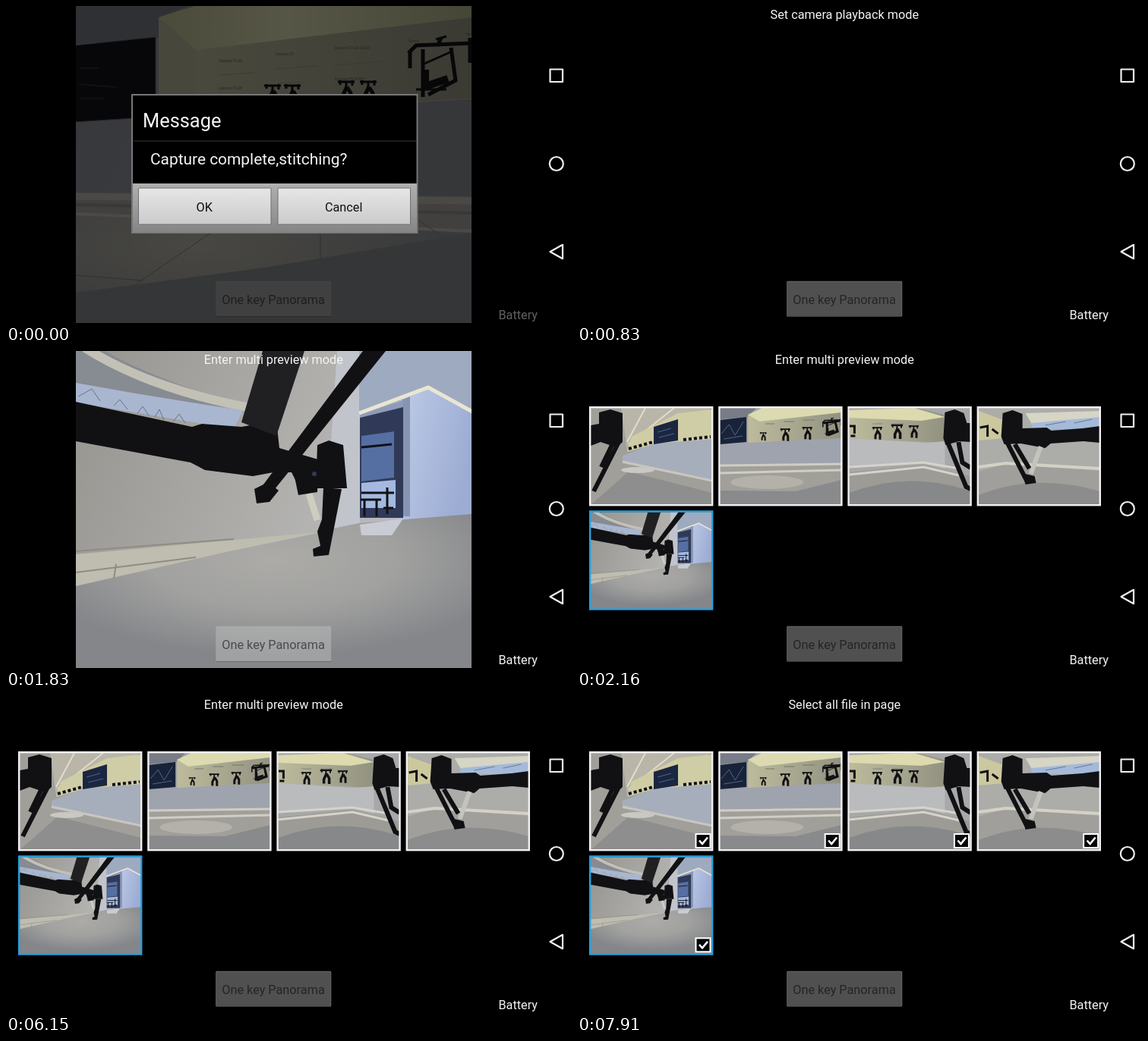
An HTML page for the animation above (8 s loop, 744 by 418 pixels).

```html
<!DOCTYPE html>
<html lang="en">
<head>
<meta charset="utf-8">
<title>One key Panorama</title>
<style>
  html, body { margin: 0; width: 100%; height: 100%; overflow: hidden; background: #000; }
  svg { display: block; }
  text { font-family: Roboto, sans-serif; font-size: 16.25px; }
  .label text { font: 4.6px "Noto Serif", serif; fill: #57574b; }
  .dark { fill: #111114; }
  .line { fill: none; stroke: #111114; }
  .mid { text-anchor: middle; }
</style>
</head>
<body>
<svg id="stage" width="100%" height="100%" viewBox="0 0 744 418">
  <defs>
    <linearGradient id="wall" x2="1" y2=".2">
      <stop stop-color="#868a93"/><stop offset=".5" stop-color="#96979f"/><stop offset="1" stop-color="#878990"/>
    </linearGradient>
    <linearGradient id="alcove" x2="1">
      <stop stop-color="#bdbb9b"/><stop offset=".4" stop-color="#acab92"/><stop offset="1" stop-color="#929281"/>
    </linearGradient>
    <linearGradient id="glow" x2="1">
      <stop stop-color="#bdbc93"/><stop offset=".4" stop-color="#d9d8b0"/><stop offset="1" stop-color="#b0b08a"/>
    </linearGradient>
    <radialGradient id="floor" cx=".3" cy=".4" r=".65">
      <stop stop-color="#b5b2a6"/><stop offset="1" stop-color="#8d8f92"/>
    </radialGradient>
    <radialGradient id="ground" cx=".5" cy=".3" r=".62">
      <stop stop-color="#acaba8"/><stop offset=".5" stop-color="#a1a19f"/><stop offset="1" stop-color="#84868a"/>
    </radialGradient>
    <linearGradient id="room" x2="1" y2=".3">
      <stop stop-color="#96948f"/><stop offset=".6" stop-color="#b0afac"/><stop offset="1" stop-color="#bdc0c8"/>
    </linearGradient>
    <linearGradient id="side" x2="1" y2=".4">
      <stop stop-color="#bdcae6"/><stop offset="1" stop-color="#9cacd3"/>
    </linearGradient>
    <linearGradient id="panel" x2="0" y2="1"><stop stop-color="#b0b0b0"/><stop offset="1" stop-color="#858585"/></linearGradient>
    <linearGradient id="key" x2="0" y2="1"><stop stop-color="#e6e6e6"/><stop offset="1" stop-color="#cbcbcb"/></linearGradient>

    <g id="gimbal">
      <path class="line" stroke-width="3" d="M-11-13H11M-8-15V-9M8-15V-8M0-13V-5"/>
      <path class="line" stroke-width="5" d="M1-7L-4 4V12M1-6L6 2V13"/>
    </g>
    <g id="rig">
      <path class="line" stroke-width="5" d="M530 62L540 52L613 49M532 60V82M573 42L568 53M549 57V120M586 55L592 98L556 117M611 42V75"/>
      <path class="line" stroke-width="10" d="M552 84V106L582 96"/>
      <path class="line" stroke-width="3" d="M566 44L580 40M551 76L587 60M540 110H580"/>
    </g>

    <!-- showroom -->
    <svg id="showroom" width="521" height="418" viewBox="92 0 521 418">
      <path fill="url(#wall)" d="M92 0H614V260H92Z"/>
      <path fill="#737881" d="M92 0H240L201 15V42L92 50Z"/>
      <path fill="url(#alcove)" d="M201 15L250 0H614V123L201 146Z"/>
      <path fill="#b3b295" d="M201 15L250 58V140L201 146Z"/>
      <path fill="url(#glow)" d="M204 14L250 0H614V15L250 58Z"/>
      <path fill="#111216" stroke="#555861" d="M90 52L197 41V146L90 153Z"/>
      <path stroke="#3b3e48" d="M97 82H122M96 103L146 107M98 122H128"/>
      <g class="label">
        <text x="280" y="74">Lumora T3-2D</text><text x="355" y="65">Lumora T5</text>
        <text x="433" y="57">Lumora T5-2D (4-HD)</text><text x="280" y="110">Lumora T4-2D</text>
        <text x="433" y="98">Lumora T6 (5-HD)</text><text x="530" y="48">Varon</text><text x="605" y="39">Vero</text>
      </g>
      <path stroke="#8a8a7a" stroke-width=".7" d="M280 91L327 88M354 83L409 79M433 78L496 73M280 126L327 123M357 102L391 100"/>
      <use href="#gimbal" x="351" y="118"/><use href="#gimbal" x="377" y="118"/>
      <use href="#gimbal" x="448" y="113"/><use href="#gimbal" x="477" y="113"/>
      <path class="line" stroke-width="4" d="M265 136H273M284 135H293"/>
      <use href="#rig"/>
      <path fill="none" stroke="#a8a8a0" d="M201 146L614 122"/>
      <path fill="url(#floor)" d="M92 246L614 251V418H92Z"/>
      <path fill="#a6a19b" d="M92 246L614 251V297L92 275Z"/>
      <path fill="none" stroke="#bdb8b0" stroke-width="9" d="M92 251L614 257"/>
      <path fill="none" stroke="#8f8d8a" stroke-width="4" d="M92 262L614 273"/>
      <path fill="none" stroke="#bdb9b1" stroke-width="4" d="M92 274L614 297"/>
      <path fill="#85878a" d="M92 378L340 345L614 299V418H92Z"/>
      <path fill="none" stroke="#777875" d="M315 268L172 366M414 270V336M527 272L578 306M92 355L180 362"/>
    </svg>

    <!-- aircraft arm -->
    <svg id="arm" width="521" height="418" viewBox="92 0 521 418">
      <path fill="url(#room)" d="M92 0H614V418H92Z"/>
      <path fill="#878b92" d="M92 0H130Q210 45 322 72L312 80L92 45Z"/>
      <path fill="none" stroke="#c3c0b6" stroke-width="12" d="M104-4Q190 50 322 75"/>
      <path fill="#a9b6d0" d="M92 42Q200 62 312 78L300 103L92 68Z"/>
      <path fill="none" stroke="#66738c" d="M95 60L113 50L124 66M142 72L150 64L160 77M173 82L180 73L188 85M196 87L202 77L208 91M220 93L228 83L236 95"/>
      <path fill="#c1c4cb" d="M436 0H466V245H420Z"/>
      <path fill="#9eaabf" d="M465 0H614V78L556 46L465 82Z"/>
      <path fill="url(#side)" d="M522 62L556 50L614 82V222H522Z"/>
      <path fill="#8794b2" d="M522 64L532 60V218H522Z"/>
      <path fill="#8e9cb9" d="M466 84L523 65V90H466Z"/>
      <path fill="none" stroke="#e9e6d2" stroke-width="5" d="M465 82L556 48L614 80"/>
      <path fill="#303a58" d="M466 88L523 74V220H466Z"/>
      <path fill="#566fa3" d="M468 112L511 106V167L468 172Z"/>
      <path fill="#a3b9e0" d="M468 174L513 170V207H468Z"/>
      <path class="line" stroke-width="3" d="M468 127L508 123M468 187H511M467 196H494M472 196V218M488 196V218M502 180V215M497 207H510"/>
      <path fill="url(#ground)" d="M92 308L290 262L465 227L614 215V418H92Z"/>
      <path fill="#bfbcb0" d="M92 268L290 250L420 238L290 265L92 310Z"/>
      <path fill="none" stroke="#8f8c82" stroke-width="2" d="M92 264L300 248M92 292L250 272M145 281L142 300"/>
      <path fill="#c9ccd4" d="M466 229L523 221L508 243H468Z"/>
      <path class="dark" d="M92 67L245 100L258 96L310 100L356 92L360 128L411 143L410 184L385 178L376 160L352 160L325 165L262 157L243 147L92 119Z"/>
      <path fill="#202023" d="M338 0H393L356 112L310 94Z"/>
      <path class="dark" d="M470 0H500L354 182L339 176Z"/>
      <path class="dark" d="M327 182L345 173L359 184L347 199L330 201Z"/>
      <path class="dark" d="M410 124L425 118L444 124L449 181H408Z"/>
      <path fill="none" stroke="#cfcdc0" stroke-width="9" d="M399 188L410 223"/>
      <path class="dark" d="M380 166H410V186L385 190ZM418 180L442 182L425 269L405 271L404 261L414 257L410 238L416 222Z"/>
      <circle cx="406" cy="162" r="3" fill="#2c3b5c"/>
    </svg>

    <!-- small pictures, 160 x 128 -->
    <svg id="pic0" width="160" height="128">
      <path fill="#a09f9a" d="M0 0H160V128H0Z"/>
      <path fill="#b9b6a9" d="M40 0H160L48 55Z"/>
      <path fill="none" stroke="#e2ddc8" stroke-width="2" d="M72 0L48 45M110 0L50 48"/>
      <path fill="#cfcda6" d="M48 58L54 38L115 7L160 2V42L84 48Z"/>
      <path fill="#a7aebb" d="M42 63L84 47L160 41V97L42 73Z"/>
      <path fill="#1b2640" d="M83 25L115 15V43L83 48Z"/>
      <path stroke="#4a6694" d="M88 32L106 27M90 39L110 34"/>
      <path class="line" stroke-width="4" stroke-dasharray="4 3" d="M50 54L82 45M122 42L158 38"/>
      <path fill="none" stroke="#c9c6be" stroke-width="3" d="M42 71L160 96"/>
      <path fill="#8e8e8e" d="M0 128L50 84L160 112V128Z"/>
      <ellipse cx="62" cy="82" rx="22" ry="4" fill="#c9c8c3"/>
      <path class="dark" d="M11 6L26 2L42 7V45L34 52L13 45L0 50V23L11 21Z"/>
      <path class="line" stroke-width="6" d="M37 45L4 110M29 47L14 78"/>
    </svg>
    <svg id="pic1" width="160" height="128">
      <path fill="#9ea3ae" d="M0 0H160V128H0Z"/>
      <path fill="#777c86" d="M0 0H48L36 12L0 15Z"/>
      <path fill="url(#alcove)" d="M37 9L56 0H160V40L37 46Z"/>
      <path fill="#dcdab0" d="M37 9L56 0H160V6L52 18Z"/>
      <path fill="#182339" d="M0 16L35 12V45L0 48Z"/>
      <path fill="none" stroke="#50668a" d="M2 34L12 22L20 36L31 18M5 41L30 37"/>
      <path d="M60 21H72M84 18H98M109 16H125" stroke="#77776a"/>
      <use href="#gimbal" transform="translate(57 38)scale(.4)"/><use href="#gimbal" transform="translate(86 36)scale(.6)"/>
      <use href="#gimbal" transform="translate(115 34)scale(.6)"/><use href="#rig" transform="translate(-24 1)scale(.3)"/>
      <path class="line" stroke-width="3" d="M136 20L158 17M141 20V36M152 19L155 31L142 36"/>
      <path fill="#a19f99" d="M0 75L160 73V128H0Z"/>
      <path fill="none" stroke="#d0cdc5" stroke-width="3" d="M0 76L160 74M0 86L160 82"/>
      <path fill="#898a8c" d="M0 109L100 110L160 95V128H0Z"/>
      <ellipse cx="62" cy="98" rx="48" ry="9" fill="#b3b1aa"/>
    </svg>
    <svg id="pic2" width="160" height="128">
      <path fill="#a6a8aa" d="M0 0H160V128H0Z"/>
      <path fill="url(#alcove)" d="M0 5L90 0L125 9V46L0 40Z"/>
      <path fill="#dcdaae" d="M0 3L85 0L126 12L95 17L0 13Z"/>
      <path fill="#b9bbbd" d="M0 40L102 46L126 44V80L98 73L0 78Z"/>
      <path stroke="#84847a" d="M31 21H44M57 21H72M80 23H92"/>
      <path class="line" stroke-width="3" d="M0 24H7V34M2 37H8"/>
      <use href="#gimbal" transform="translate(37 34)scale(.6)"/><use href="#gimbal" transform="translate(63 32)scale(.7)"/>
      <use href="#gimbal" transform="translate(85 32)scale(.6)"/>
      <path fill="#9d9b96" d="M0 85L98 75L160 90V128H0Z"/>
      <path fill="none" stroke="#d6d3ca" stroke-width="3" d="M0 78L98 72L145 80M0 88L98 78L145 89"/>
      <path fill="#878889" d="M0 112Q80 82 160 110V128H0Z"/>
      <path class="dark" d="M126 6L139 2L151 7L155 20H160V45L145 44L127 49L124 40Z"/>
      <path class="line" stroke-width="6" d="M130 46L154 104L160 107M144 45L149 72L160 79"/>
    </svg>
    <svg id="pic3" width="160" height="128">
      <path fill="#acaca9" d="M0 0H160V128H0Z"/>
      <path fill="#cbc89f" d="M0 4L33 16V40L0 43Z"/>
      <path fill="#d6d5c6" d="M62 7L160 4V20L72 24Z"/>
      <path fill="#a5bad9" d="M70 20L160 12V28H70Z"/>
      <path stroke="#667997" d="M88 23L115 18M126 20L150 15"/>
      <path class="line" stroke-width="3" d="M2 26L12 24V38M18 28L26 34"/>
      <path fill="#a09f9b" d="M0 84L34 74L160 83V128H0Z"/>
      <path fill="none" stroke="#d4d1c5" stroke-width="4" d="M0 78L36 73L160 80"/>
      <path fill="#8c8c8c" d="M0 115Q75 85 160 110V128H0Z"/>
      <path class="dark" d="M32 7L45 3L58 8V27L90 26L96 30L137 27L160 24V46L138 44L95 47L88 53L56 47L34 48L30 38Z"/>
      <path fill="none" stroke="#c5c4bc" stroke-width="6" d="M82 51L69 87"/>
      <path class="line" stroke-width="6" d="M37 44L63 95M48 48L67 80"/>
      <path class="dark" d="M57 86L74 90L76 99L62 101Z"/>
    </svg>

    <g id="check">
      <rect x="138.5" y="107" width="19" height="18" fill="#050505" stroke="#fff" stroke-width="2"/>
      <path d="M143 115.5L147 120L154 111.5" fill="none" stroke="#fff" stroke-width="2.6"/>
    </g>
  </defs>

  <path d="M0 0H744V418H0Z"/>
  <use id="live" href="#showroom" x="92"/>
  <use id="single" href="#arm" x="92"/>
  <g id="grid"></g>

  <g>
    <rect x="276.5" y="363" width="151.5" height="46.5" rx="1" fill="#c8c8c8" fill-opacity=".4" stroke="#aaa" stroke-opacity=".35"/>
    <path d="M277 409.5H428" stroke="#000" stroke-opacity=".3"/>
    <text class="mid" x="352" y="392.5" fill-opacity=".55">One key Panorama</text>
  </g>
  <text x="648.5" y="412.5" fill="#f4f4f4">Battery</text>
  <text id="status" class="mid" x="352.3" y="16.5" fill="#f4f4f4"></text>

  <g id="dialog">
    <path d="M0 0H744V418H0Z" fill-opacity=".6"/>
    <rect x="166" y="117" width="375.5" height="182" fill="#000" stroke="#777" stroke-width="2"/>
    <path d="M168 178H540" stroke="#252525" stroke-width="1.5"/>
    <text x="180" y="159.5" fill="#f5f5f5" style="font-size:25.4px">Message</text>
    <text x="190" y="209" fill="#f5f5f5" style="font-size:20.9px">Capture complete,stitching?</text>
    <path d="M167 234H541V298.5H167Z" fill="url(#panel)"/>
    <g fill="url(#key)" stroke="#707070">
      <rect x="174.5" y="240" width="174.5" height="48" rx="1"/><rect x="358" y="240" width="174.5" height="48" rx="1"/>
    </g>
    <text class="mid" x="261.3" y="270.5" fill="#111">OK</text>
    <text class="mid" x="444.7" y="270.5" fill="#111">Cancel</text>
  </g>

  <g fill="none" stroke="#f0f0f0" stroke-width="2.2" stroke-linejoin="round">
    <rect x="716.5" y="83.5" width="16.5" height="16.5"/>
    <circle cx="724.8" cy="208" r="9"/>
    <path d="M716.5 324L733 314.8V333.2Z"/>
  </g>
</svg>
<script>
const LOOP = 8000;
const $ = id => document.getElementById(id);
const show = (el, on) => el.style.display = on ? '' : 'none';

// thumbnail grid: four across, the newest picture highlighted below
$('grid').innerHTML = [0, 1, 2, 3, 4].map(i => {
  const x = 18 + i % 4 * 170.2, y = i < 4 ? 75 : 212.3;
  const pic = i < 4 ? `<use href="#pic${i}"/>` : '<use href="#arm" transform="scale(.3065)"/>';
  return `<g transform="translate(${x} ${y})">${pic}
    <rect x="-.8" y="-.8" width="161" height="129" fill="none" stroke="${i < 4 ? '#f2eff2' : '#2b9fda'}" stroke-width="2.4"/>
    <use class="tick" href="#check"/></g>`;
}).join('');
const ticks = document.querySelectorAll('.tick');

const messages = [
  [0, ''],
  [640, 'Set camera playback mode'],
  [1730, 'Enter multi preview mode'],
  [7150, 'Select all file in page']
];

function draw(t) {
  show($('live'), t < 830);
  show($('single'), t >= 1010 && t < 2160);
  show($('grid'), t >= 2160);
  show($('dialog'), t < 770);
  $('dialog').style.opacity = t < 640 ? 1 : .5;
  $('status').textContent = messages.findLast(m => t >= m[0])[1];
  ticks.forEach(el => show(el, t >= 7780));
}

const start = performance.now();
function frame() {
  draw((performance.now() - start) % LOOP);
  requestAnimationFrame(frame);
}
frame();
</script>
</body>
</html>
```
